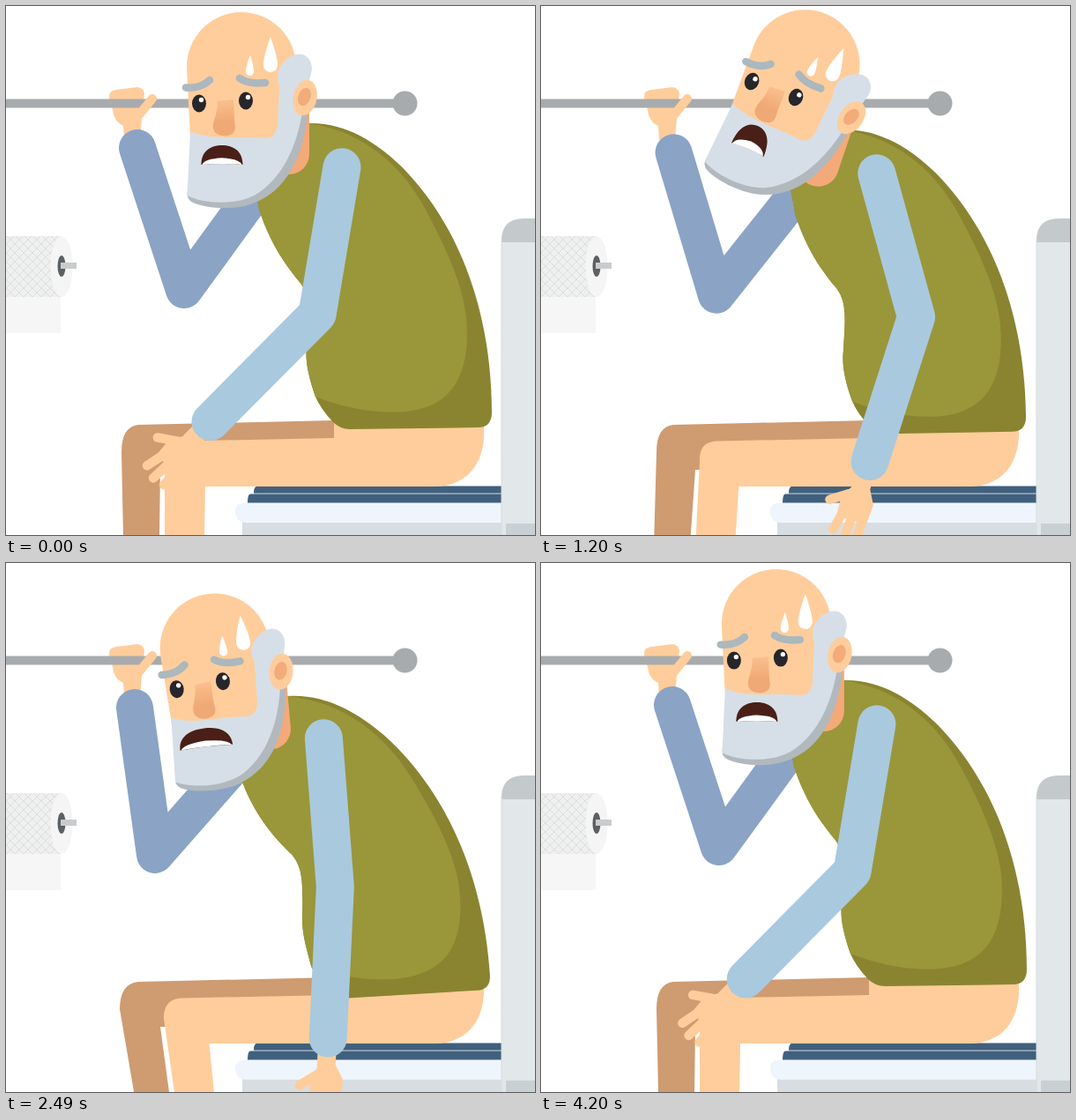
An HTML page that plays this animation: 600 by 600 pixels, repeating every 4230 ms.

```html
<!DOCTYPE html>
<html lang="en">
<head>
<meta charset="utf-8">
<style>
html, body { margin: 0; width: 100%; height: 100%; overflow: hidden; background: #fff; }
svg { display: block; width: 100vw; height: 100vh; }
</style>
</head>
<body>
<svg viewBox="0 0 600 600">
  <defs>
    <pattern id="quilt" width="10" height="10" patternUnits="userSpaceOnUse">
      <path d="M0 0L10 10M10 0L0 10" stroke="#dcdddd" stroke-width="1"/>
    </pattern>
    <linearGradient id="noseTone" x2="0" y2="1">
      <stop offset="0" stop-color="#fbc08e"/><stop offset=".6" stop-color="#efa977"/>
    </linearGradient>
    <g id="eye">
      <ellipse rx="8" ry="10" fill="#26262b"/>
      <circle cx="2.500" cy="-4" r="2.700" fill="#fff"/>
    </g>
  </defs>

  <g id="paper">
    <path d="M0 325H62V371H0Z" fill="#f6f6f6"/>
    <path d="M0 261H62V330H0Z" fill="#eeefef"/>
    <path d="M0 261H62V330H0Z" fill="url(#quilt)"/>
    <ellipse cx="63" cy="295.500" rx="12.500" ry="34.500" fill="#f5f5f5"/>
    <ellipse cx="63" cy="295" rx="4.500" ry="12" fill="#5c6063"/>
    <path d="M62 291H80V298H62Z" fill="#c9cccd"/>
  </g>

  <g id="rail">
    <path d="M134 152L133 136Q122 131 121 118L117 104Q116 96 125 95L149 92Q156 93 157 99L154 128L152 152Z" fill="#ffcd9b"/>
    <path d="M0 110.500H452" stroke="#a8abad" stroke-width="10"/>
    <circle cx="452.500" cy="110.500" r="14" fill="#a8abad"/>
    <path d="M148 127L166 105" stroke="#ffcd9b" stroke-width="10" stroke-linecap="round"/>
  </g>

  <g id="seat">
    <path d="M268 584H567V600H268Z" fill="#d8dde1"/>
    <path d="M567 584H600V600H567Z" fill="#c8d0d4"/>
    <path d="M562 564H268Q260 564 260 574Q261 586 272 586H562Z" fill="#eef5fd"/>
    <path d="M562 544.500H285Q281 545 281 552H562Z" fill="#41607d"/>
    <path d="M562 553.500H277Q274 554 274 563.500H562Z" fill="#41607d"/>
    <path d="M281 552.700H562" stroke="#7f96aa" stroke-width="1.500"/>
  </g>

  <path id="farArm" fill="none" stroke="#8ba3c5" stroke-width="42" stroke-linecap="round" stroke-linejoin="round"/>
  <path id="farLeg" fill="#cf9b71"/>
  <path id="nearLeg" fill="#ffcd9b"/>
  <g id="torso">
    <path id="shirt" fill="#8a8430"/>
    <path id="shirtFront" fill="#9a963a"/>
  </g>
  <path id="neck" d="M-19 20V65" stroke="#f4a978" stroke-width="46" stroke-linecap="round"/>

  <g id="head">
    <path d="M206 210Q204 219 212 223C225 229 250 231 270 227C312 217 336 180 342 122L320 118L225 205Z" fill="#b1b9be"/>
    <path d="M205 69A62 62 0 0 1 329 69L316 150H209Q207 110 205 69Z" fill="#ffcd9b"/>
    <path d="M209 142L205.500 215C225 225 262 226 283 214C315 195 331 155 336 120L347 72C347 55 333 51 324 57Q318 59 313 66Q305 76 310 90L308 136Q306 150 294 150C268 147 231 153 209 142Z" fill="#d6dfe7"/>
    <ellipse cx="339" cy="104" rx="13.500" ry="20.500" transform="rotate(12 339 104)" fill="#ffcd9b"/>
    <ellipse cx="338.500" cy="103" rx="7" ry="10.500" transform="rotate(20 338 103)" fill="#f2ab79"/>
    <path d="M240 108C240 124 234 130 235 139Q237 147 248 147.500Q260 147 260 137C258 125 259 115 258 106Z" fill="url(#noseTone)"/>
    <use href="#eye" x="219" y="110.500"/>
    <use href="#eye" x="272" y="107.500"/>
    <path id="lids" fill="#ffcd9b"/>
    <path d="M204 92.500Q221 94 231 84M265 82Q275 89 294 87" fill="none" stroke="#abb8be" stroke-width="8.500" stroke-linecap="round"/>
    <path d="M300 35Q308 58 308 67A8 8 0 0 1 292 67Q292 57 300 35ZM277 56Q281 68 281 74.500A4.500 4.500 0 0 1 272 74.500Q272 68 277 56Z" fill="#fff"/>
    <g transform="translate(245 169)">
      <path id="mouth" fill="#4a1f17"/>
      <path id="teeth" fill="#fff"/>
    </g>
  </g>

  <g id="nearHand" fill="#ffcd9b" stroke="#ffcd9b" stroke-linecap="round">
    <path d="M-11 15L-11 34L-19 48L-17 70L18 70L19 46L10 30L10 15Z" stroke="none"/>
    <path d="M-11 42L-30 55M-11 62L-16 86M0 64L-1 91M12 62L13 88" stroke-width="10.500" fill="none"/>
  </g>
  <path id="nearArm" fill="none" stroke="#a9c9de" stroke-width="43" stroke-linecap="round" stroke-linejoin="round"/>

  <g id="tank">
    <path d="M562 266H600V587H567V600H562Z" fill="#e2e7e9"/>
    <path d="M562 268V264Q563 241 588 241H600V268Z" fill="#c4cacc"/>
    <path d="M562 264V600" stroke="#d5dcdf" stroke-width="1"/>
  </g>
</svg>
<script>
const LOOP = 4230, STEP = 30;
const part = {};
document.querySelectorAll("svg [id]").forEach(el => part[el.id] = el);
const draw = (name, d) => part[name].setAttribute("d", d);
const place = (name, value) => part[name].setAttribute("transform", value);

const pose = (hips, upper, fore, farArm, head, mouth, shin) =>
  [...hips, upper, fore, ...farArm, ...head, ...mouth, shin];

// hips: neck, right hem, left hem; farArm: cuff, elbow, angle; head: ear, tilt
const upright = pose([343, 133, 551, 479, 378, 480], -9.5, -44.8, [149, 161, 202, 322, 36], [340, 103, 0], [47, 22], 0);
const lean = pose([312, 146, 551, 470, 380, 487], 21.2, -14, [148, 168, 173, 337, 38], [321, 130, 14.5], [37, 33], 5);
const back = pose([385, 133, 549, 502, 380, 483], 7.5, -23, [154, 164, 234, 315, 38.7], [397, 121, 31], [43, 25], -18);
const droop = pose([319, 151, 550, 485, 376, 494], 4.4, -2.7, [146, 164, 169, 331, 41.3], [313, 122, -6.5], [60, 22], 11);
const slump = pose([308, 151, 552, 476, 376, 492], 4.1, 0.7, [146, 163, 156, 332, 45], [295, 121, -14.5], [30, 33], 17);
const rise = pose([322, 142, 551, 475, 378, 487], -2, -19.1, [146, 160, 175, 327, 40], [314, 112, -7], [43, 25], 8);
const backHeld = back.map((v, i) => i === back.length - 1 ? v - 3 : v);

const keys = [[0, upright], [930, lean], [1530, back], [2160, backHeld], [2490, droop],
  [2720, slump], [3220, slump], [3660, rise], [LOOP, upright]];

// Monotone tangent: flat at extremes, smooth when passing through
function tangent(k, i) {
  if (k === 0 || k === keys.length - 1) return 0;
  const slope = n => (keys[n + 1][1][i] - keys[n][1][i]) / (keys[n + 1][0] - keys[n][0]);
  const a = slope(k - 1), b = slope(k);
  return a * b > 0 ? 2 * a * b / (a + b) : 0;
}

function poseAt(t) {
  let k = 0;
  while (t >= keys[k + 1][0]) k++;
  const [t0, from] = keys[k], [t1, to] = keys[k + 1];
  const span = t1 - t0, u = (t - t0) / span, u2 = u * u, u3 = u2 * u;
  return from.map((v, i) => v * (2 * u3 - 3 * u2 + 1) + to[i] * (3 * u2 - 2 * u3)
    + span * (tangent(k, i) * (u3 - 2 * u2 + u) + tangent(k + 1, i) * (u3 - u2)));
}

const reach = ([x, y], deg, length) => {
  const a = deg * Math.PI / 180;
  return [x + length * Math.sin(a), y + length * Math.cos(a)];
};
const polyline = points => "M" + points.map(p => p.join(" ")).join("L");

function torsoMatrix(nx, ny, rx, ry, lx, ly) {
  const a = (rx - lx) / 173, b = (ry - ly) / 173;
  const c = (nx - lx + 35 * a) / -347, d = (ny - ly + 35 * b) / -347;
  return [a, b, c, d, lx - 378 * a - 480 * c, ly - 378 * b - 480 * d];
}

function drawTorso(matrix, tuck) {
  place("torso", `matrix(${matrix.join(" ")})`);
  const front = `C${343 + tuck} 420 ${339 + tuck} 402 ${341 + tuck} 385
    C${344 + tuck} 345 ${345 + tuck} 330 ${334 + tuck} 314
    C${317 + tuck / 2} 294 299 268 287 230L280 192L310 150Q325 133 343 133`;
  draw("shirt", `M343 133C385 132 420 155 449 183C515 250 551 350 551 462
    Q551 479 535 479L390 480Q379 480 371 472Q357 457 351 443${front}Z`);
  draw("shirtFront", `M343 133C410 143 452 187 475 230C510 295 523 335 523 372
    C523 425 502 461 440 461C405 461 375 452 351 443${front}Z`);
}

function drawLegs(s) {
  const knee = 131 - Math.max(0, s) * .18;
  draw("farLeg", `M372 470L150 475Q${knee} 477 ${knee} 506L${133 + s * 1.1} 600H${174 + s}
    L175 526H200L372 490Z`);
  draw("nearLeg", `M372 490V464H542V478C544 518 524 545 485 545H${226 + s * .4}L${225 + s} 600
    H${180 + s}L${180 - Math.max(0, s) * .1} 516Q179 494 200 493.5Z`);
}

function drawMouth(w, h) {
  draw("mouth", `M${-w / 2} ${h / 2}C${-w / 2} ${-h * .2} ${-w * .28} ${-h / 2} 0 ${-h / 2}
    S${w / 2} ${-h * .2} ${w / 2} ${h / 2}Q0 ${h * .4} ${-w / 2} ${h / 2}Z`);
  draw("teeth", `M${-w * .48} ${h / 2}Q${-w * .43} ${h * .2} 0 ${h * .15}
    Q${w * .43} ${h * .2} ${w * .48} ${h / 2}Q0 ${h * .4} ${-w * .48} ${h / 2}Z`);
}

function drawLids(t) {
  const shut = Math.max(0, 1 - Math.abs(t - 3705) / 90);
  const lid = (x, y) => `M${x - 11} ${y - 11}h22v${shut * 22}h-22Z`;
  draw("lids", shut ? lid(219, 110) + lid(272, 107) : "");
}

function render(t) {
  const [nx, ny, rx, ry, lx, ly, upper, fore, cx, cy, ex, ey, farAngle,
    earX, earY, tilt, mouthW, mouthH, shin] = poseAt(t);
  const m = torsoMatrix(nx, ny, rx, ry, lx, ly);
  drawTorso(m, (343 - nx) * .14);
  drawLegs(shin);

  const shoulder = [m[0] * 381 + m[2] * 183 + m[4], m[1] * 381 + m[3] * 183 + m[5]];
  const elbow = reach(shoulder, upper, 169), wrist = reach(elbow, fore, 172);
  draw("nearArm", polyline([shoulder, elbow, wrist]));
  place("nearHand", `translate(${wrist.join(" ")}) rotate(${-fore})`);
  draw("farArm", polyline([[cx, cy], [ex, ey], reach([ex, ey], 180 - farAngle, 130)]));

  place("neck", `translate(${earX} ${earY}) rotate(${tilt * .8})`);
  place("head", `translate(${earX} ${earY}) rotate(${tilt}) translate(-340 -103)`);
  drawMouth(mouthW, mouthH);
  drawLids(t);
}

const start = performance.now();
function tick() {
  const t = (performance.now() - start) % LOOP;
  render(Math.floor(t / STEP) * STEP);
  requestAnimationFrame(tick);
}
tick();
</script>
</body>
</html>
```
